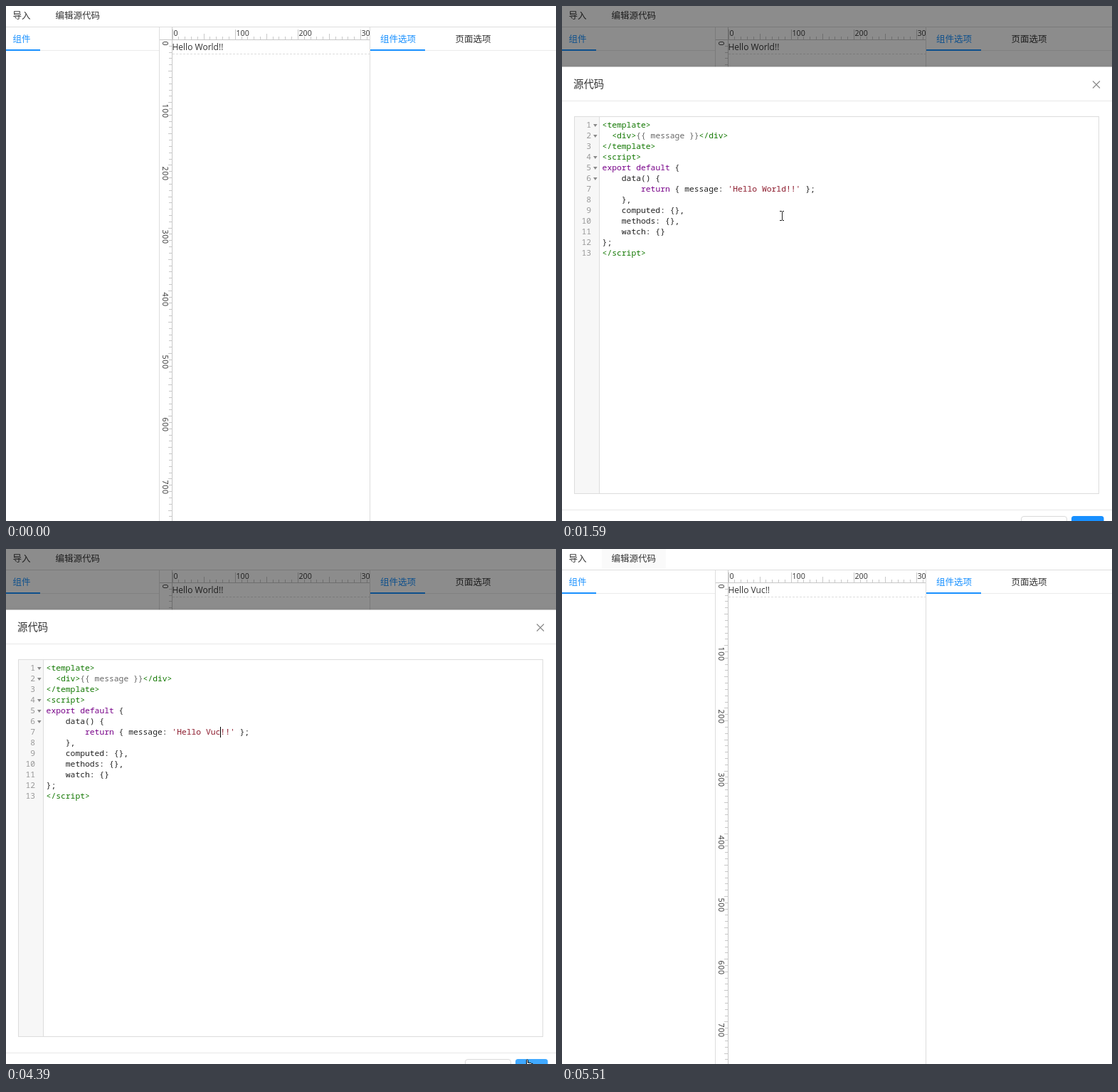
An HTML page for the animation above (7.71 s loop, 773 by 724 pixels).

```html
<!DOCTYPE html>
<html lang="zh">
<head>
<meta charset="utf-8">
<title>Code editor</title>
<style>
  html, body { margin: 0; width: 100%; height: 100%; overflow: hidden; background: #fff; }
  svg { display: block; width: 100%; height: 100%; }
  text { white-space: pre; }
  .ui { font: 12.5px "Noto Sans CJK SC", "Noto Sans CJK", sans-serif; fill: #333; }
  .latin { font: 12px "Open Sans", sans-serif; fill: #333; }
  .ruler { font: 10.7px "Open Sans", sans-serif; fill: #333; }
  .code { font: 11.33px "Noto Sans Mono", monospace; fill: #222; }
  .num { fill: #999; text-anchor: end; }
  .blue { fill: #1890ff; }
  .tag { fill: #170; }
  .key { fill: #708; }
  .str { fill: #8c1a2c; }
  .meta { fill: #666; }
  .line { fill: none; stroke: #ddd; shape-rendering: crispEdges; }
</style>
</head>
<body>
<svg viewBox="0 0 773 724">
  <defs>
    <filter id="shadow" x="-10%" y="-10%" width="120%" height="120%">
      <feDropShadow dx="0" dy="4" stdDeviation="5" flood-opacity=".2"/>
    </filter>
  </defs>

  <rect width="773" height="724" fill="#fff"/>
  <rect id="hover" x="56" width="90" height="28" fill="#fafafa"/>
  <text class="ui" x="9.5" y="17.8">导入</text>
  <text class="ui" x="69.5" y="17.8">编辑源代码</text>
  <g id="rulers"></g>
  <text id="output" class="latin" x="233.5" y="62"></text>
  <path class="line" d="M234 67.5H511" stroke-dasharray="3 2"/>
  <rect x="512" y="30" width="261" height="694" fill="#fff"/>
  <path class="line" d="M0 29.5H773M215.5 30V724M511.5 30V724"/>
  <path class="line" d="M0 62.5H215M512 62.5H773" style="stroke:#ebebeb"/>
  <path class="blue" d="M0 61H48V63H0ZM512 61H589V63H512Z"/>
  <text class="ui blue" x="9.5" y="51.2">组件</text>
  <text class="ui blue" x="526" y="51.2">组件选项</text>
  <text class="ui" x="631.5" y="51.2">页面选项</text>

  <rect id="mask" width="773" height="724"/>

  <g id="modal">
    <rect x="-4" y="85.5" width="779.6" height="668" rx="3.5" fill="#fff" filter="url(#shadow)"/>
    <path class="line" d="M-4 133.5H775.6M-4 708H775.6" style="stroke:#e8e8e8"/>
    <text class="ui" x="16" y="115.3" style="font-size:14.4px">源代码</text>
    <path d="M746 105.5L756 115.5M756 105.5L746 115.5" stroke="#888" stroke-width="1.1"/>
    <rect x="17" y="155" width="36" height="531" fill="#f7f7f7"/>
    <path class="line" d="M52.5 156V685M17.5 155.5H754.5V685.5H17.5Z"/>
    <rect id="selection" x="281" y="250" width="34" height="15" fill="#d7d4f0"/>
    <g id="code"></g>
    <path id="folds" fill="#888"/>
    <rect id="caret" y="250" width="1" height="15"/>
    <rect x="645.5" y="717.5" width="64" height="27" rx="3.5" fill="#fff" stroke="#d9d9d9"/>
    <rect id="ok" x="716" y="717" width="45.5" height="28" rx="3.5"/>
    <text class="latin" x="677.5" y="735" text-anchor="middle" style="fill:#555">Cancel</text>
    <text class="latin" x="738.7" y="735" text-anchor="middle" style="fill:#fff">OK</text>
  </g>

  <circle id="click" r="11" fill="#ffec1a" fill-opacity=".8"/>
  <g id="cursor">
    <path id="arrow" d="M.5 .7V14.5L3.7 11.5L6 16.5L8 15.6L5.8 10.8H10.3Z" fill="#fff" stroke="#000"/>
    <path id="beam" d="M0 .5H2.5M3.5 .5H6M3 1V13M0 13.5H2.5M3.5 13.5H6" stroke="#222" shape-rendering="crispEdges"/>
    <path id="hand" d="M2.5 9V1.5Q3.5 0 4.5 1.5V5.5Q6 4.2 7 5.8Q8.5 4.8 9.5 6.4Q11.5 5.8 12 8V13L10.5 17H4.5L.5 10.5Q.5 8 2.5 9Z" fill="#fff" stroke="#000"/>
  </g>
</svg>

<script>
const LOOP = 7710;
const CHAR = 6.8, LINE = 15, CODE_X = 56.6, CODE_Y = 160;
const el = id => document.getElementById(id);

function buildRulers() {
  const step = 8.82, x0 = 234, y0 = 47.5;
  let ticks = '', labels = '';
  for (let i = 0; i < 77; i++) {
    const size = i % 10 === 0 ? 14 : i % 5 === 0 ? 8 : 4;
    const x = Math.floor(x0 + i * step) + .5, y = Math.floor(y0 + i * step) + .5;
    if (x < 511) ticks += `M${x} 47v${-size}`;
    ticks += `M233 ${y}h${-Math.min(size, 5)}`;
    if (i % 10) continue;
    if (x < 511) labels += `<text x="${x + 1}" y="42.3">${i * 10}</text>`;
    labels += `<text transform="translate(220.3 ${y + 2})rotate(90)" letter-spacing=".7">${i * 10}</text>`;
  }
  el('rulers').innerHTML =
    `<path class="line" style="stroke:#c8c8c8" d="${ticks}M233.5 30V724M216 47.5H511"/><g class="ruler">${labels}</g>`;
}

const span = name => text =>
  `<tspan class="${name}">${text.replace(/</g, '&lt;').replace(/>/g, '&gt;')}</tspan>`;
const tag = span('tag'), key = span('key'), str = span('str'), meta = span('meta');
const messageLine = word =>
  `        ${key('return')} { message: ${str(`'Hello ${word}!!'`)} };`;

function buildCode() {
  const lines = [
    tag('<template>'),
    `  ${tag('<div>')}${meta('{{ message }}')}${tag('</div>')}`,
    tag('</template>'),
    tag('<script>'),
    `${key('export')} ${key('default')} {`,
    '    data() {',
    '',
    '    },',
    '    computed: {},',
    '    methods: {},',
    '    watch: {}',
    '};',
    tag('<\/script>')
  ];
  el('code').innerHTML = lines.map((line, i) => {
    const y = CODE_Y + i * LINE + 11.3;
    return `<text class="code num" x="41" y="${y}">${i + 1}</text>` +
      `<text class="code" id="line${i + 1}" x="${CODE_X}" y="${y}">${line}</text>`;
  }).join('');
  el('folds').setAttribute('d', [1, 2, 4, 5, 6]
    .map(n => `M44 ${CODE_Y + n * LINE - 9}h5.6l-2.8 4z`).join(''));
}

// Each track lists [start in ms, ...values]; a value holds until the next start.
const tracks = {
  cursor: [
    [0, ''],
    [200, 'arrow', 253, 216], [390, 'arrow', 174, 100], [590, 'arrow', 135, 41],
    [790, 'arrow', 108, 18], [990, 'arrow', 106, 22], [1190, 'arrow', 273, 119],
    [1390, 'arrow', 434, 300], [1590, 'beam', 306, 288], [1790, 'beam', 292, 261],
    [1990, 'beam', 292, 260], [2190, 'beam', 292, 246], [4190, 'beam', 306, 280],
    [4390, 'hand', 729, 717], [5290, 'arrow', 723, 721], [5510, '']
  ],
  click: [[0, false], [990, true, 105, 22], [1190, false], [2390, true, 293, 252.8], [2790, false]],
  modal: [[0, 0, 1], [1190, .98, .9886], [1390, 1, 1], [4590, .85, .8762], [5290, 0, 1]],
  mask: [[0, 0], [1190, .45], [4590, .3], [5290, 0]],
  word: [[0, 'World'], [2990, 'V'], [3590, 'Vu'], [3790, 'Vuc']],
  caret: [[0, -1], [2390, 2], [2590, -1], [2990, 1], [3590, 2], [3790, 3], [4590, -1]],
  selection: [[0, false], [2590, true], [2990, false]],
  output: [[0, 'World'], [4590, 'Vuc']],
  folds: [[0, false], [1390, true]],
  ok: [[0, '#1890ff'], [4390, '#40a9ff']],
  hover: [[0, false], [5290, true]]
};
const at = (name, t) => tracks[name].findLast(row => row[0] <= t).slice(1);
const show = (id, on) => { el(id).style.display = on ? '' : 'none'; };
const move = (id, x, y) => el(id).setAttribute('transform', `translate(${x} ${y})`);

function render(t) {
  const [kind, x = 0, y = 0] = at('cursor', t);
  for (const id of ['arrow', 'beam', 'hand']) show(id, id === kind);
  move('cursor', x, y);

  const [clicked, cx = 0, cy = 0] = at('click', t);
  show('click', clicked);
  move('click', cx, cy);

  const [opacity, scale] = at('modal', t);
  show('modal', opacity > 0);
  el('modal').style.opacity = opacity;
  // The dialog zooms out of the clicked menu entry.
  el('modal').setAttribute('transform',
    `translate(${108 * (1 - scale)} ${16 * (1 - scale)}) scale(${scale})`);
  el('mask').style.opacity = at('mask', t)[0];

  const [column] = at('caret', t);
  show('caret', column >= 0);
  el('caret').setAttribute('x', Math.round(281 + column * CHAR));
  for (const id of ['selection', 'folds', 'hover']) show(id, at(id, t)[0]);

  el('line7').innerHTML = messageLine(at('word', t)[0]);
  el('output').textContent = `Hello ${at('output', t)[0]}!!`;
  el('ok').setAttribute('fill', at('ok', t)[0]);
}

buildRulers();
buildCode();
const start = performance.now();
let lastSlot = -1;
function tick() {
  const t = (performance.now() - start) % LOOP;
  const slot = Math.floor(t / 10);
  if (slot !== lastSlot) render(t);
  lastSlot = slot;
  requestAnimationFrame(tick);
}
tick();
</script>
</body>
</html>
```
